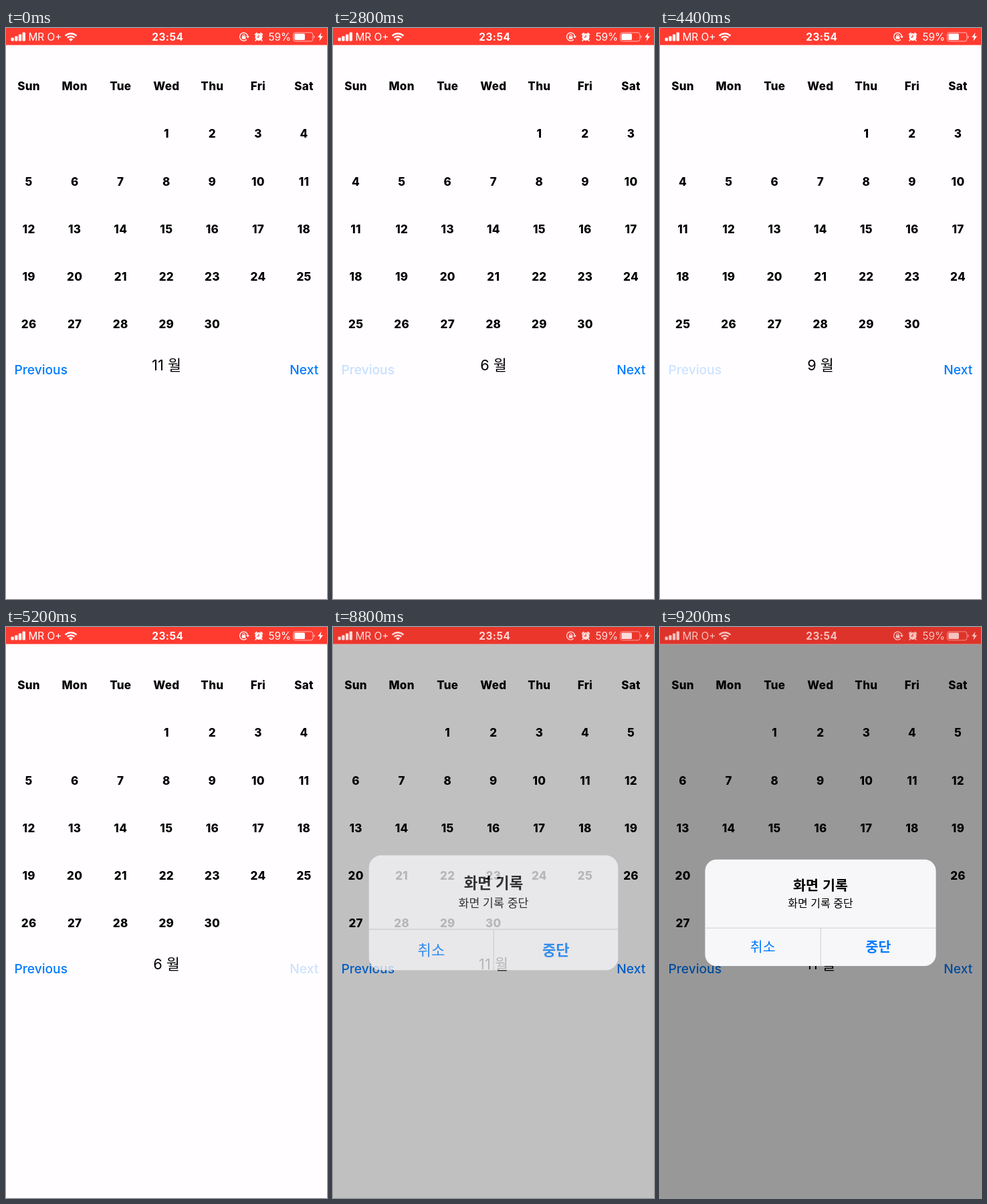
These frames come from a looping animation (480 px wide and 854 px high, 9300 ms). An HTML page:

```html
<!DOCTYPE html>
<html lang="ko">
<head>
<meta charset="utf-8">
<title>Calendar</title>
<style>
  html, body { margin: 0; width: 100%; height: 100%; overflow: hidden; background: #fffdff; }
  svg { display: block; width: 100vw; height: 100vh; }
  text { font-family: Inter, 'Noto Sans CJK KR', 'Noto Sans CJK', sans-serif; white-space: pre; }
  .mid { text-anchor: middle; }
  #grid text { font-size: 17px; font-weight: 800; letter-spacing: .3px; text-anchor: middle; }
  .btn { font-size: 19.2px; font-weight: 500; fill: #007aff; }
  #month { font-size: 21.76px; }
  #status { fill: #fff; font-size: 15.36px; }
  .line { fill: none; stroke: #fff; }
  #alert text { font-family: 'Noto Sans CJK KR', 'Noto Sans CJK', sans-serif; text-anchor: middle; }
  #alert .action { font-size: 20.5px; fill: #007aff; }
  #alert .bold { font-weight: 700; }
</style>
</head>
<body>
<svg viewBox="0 0 480 854">
  <rect width="480" height="854" fill="#fffdff"/>
  <g id="grid"></g>
  <text id="prev" class="btn" x="12.4" y="517.7">Previous</text>
  <text id="month" class="mid" x="240" y="512"></text>
  <text id="next" class="btn" x="467.3" y="517.7" text-anchor="end">Next</text>
  <rect id="dim" y="25.5" width="480" height="829"/>

  <rect width="480" height="25.5" fill="#ff3b30"/>
  <rect id="barDim" width="480" height="25.5"/>
  <g id="status">
    <rect x="7.5" y="14.6" width="4.3" height="4.8" rx="1"/>
    <rect x="13.2" y="12.2" width="4.3" height="7.2" rx="1"/>
    <rect x="18.9" y="9.6" width="4.3" height="9.8" rx="1"/>
    <rect x="24.6" y="6.6" width="4.3" height="12.8" rx="1"/>
    <text x="33.5" y="18.7">MR O+</text>
    <path class="line" stroke-width="2.5" d="M88.6 11.6A12 12 0 0 1 105.4 11.6M91.7 14.7A7.6 7.6 0 0 1 102.3 14.7"/>
    <path d="M97 20L93.9 16.9A4.4 4.4 0 0 1 100.1 16.9Z"/>
    <text class="mid" x="241.8" y="18.7" font-weight="700" letter-spacing=".5">23:54</text>
    <path class="line" stroke-width="1.3" d="M359.8 17.3A6 6 0 1 1 361.5 12.3"/>
    <path d="M359 12.2H364L361.5 15.6Z"/>
    <rect x="352.7" y="12.3" width="5.6" height="4.2" rx=".6"/>
    <path class="line" stroke-width="1.1" d="M353.9 12.5V11.3A1.6 1.6 0 0 1 357.1 11.3V12.5"/>
    <circle cx="378" cy="13.4" r="5.5"/>
    <path class="line" stroke-width="1.8" stroke-linecap="round" d="M372.6 9.7L375 7.6M383.4 9.7L381 7.6M374 18L373.2 18.9M382 18L382.8 18.9"/>
    <path fill="none" stroke="#ff3b30" stroke-width="1.1" d="M378 10V13.6H375.2"/>
    <text x="392.4" y="18.7">59%</text>
    <rect class="line" x="429.6" y="6.9" width="29.3" height="12.9" rx="3" stroke-opacity=".65"/>
    <rect x="431.3" y="8.6" width="15.6" height="9.5" rx="1.4"/>
    <path d="M460.2 11.1A2.5 2.5 0 0 1 460.2 15.6Z" opacity=".65"/>
    <path d="M471.6 6.8L466.2 14H469.6L468.4 19.8L474 12.2H470.5Z"/>
  </g>

  <g id="alert">
    <rect x="67.4" y="347.8" width="345.2" height="159.2" rx="17" fill="#f7f6f8"/>
    <path d="M67.4 450.3H412.6M240.3 450.3V507" stroke="#cfced1" fill="none"/>
    <text class="bold" x="240" y="393.8" font-size="20.7">화면 기록</text>
    <text x="240" y="419.2" font-size="16">화면 기록 중단</text>
    <text class="action" x="153.7" y="486.2">취소</text>
    <text class="action bold" x="326.4" y="486.2">중단</text>
  </g>
</svg>
<script>
const LOOP = 9300, STEP = 100, FADE = 470, ALERT_AT = 8700;
const $ = id => document.getElementById(id);

function cell(col, row, label = '') {
  const el = document.createElementNS('http://www.w3.org/2000/svg', 'text');
  el.setAttribute('x', 34.1 + col * 68.57);
  el.setAttribute('y', 93 + row * 71.25);
  el.textContent = label;
  return $('grid').appendChild(el);
}
['Sun', 'Mon', 'Tue', 'Wed', 'Thu', 'Fri', 'Sat'].forEach((day, i) => cell(i, 0, day));
const cells = Array.from({ length: 35 }, (_, i) => cell(i % 7, 1 + Math.floor(i / 7)));

// Button taps: the month turns on release
const taps = [{ dir: -1, down: 1250, up: 1450 }];
function addTaps(dir, count, start, gap, hold) {
  for (let k = 0; k < count; k++) {
    const down = start + k * gap;
    taps.push({ dir, down, up: down + hold(k) });
  }
}
addTaps(-1, 16, 2180, 165, k => k === 5 || k === 6 ? 140 : 80);
addTaps(1, 5, 5150, 148, () => 85);

function buttonAlpha(dir, t) {
  const tap = taps.filter(p => p.dir === dir && p.down <= t).pop();
  if (!tap) return 1;
  const p = Math.min(1, Math.max(0, (t - tap.up) / FADE));
  return 0.2 + 0.8 * p * p * (3 - 2 * p);
}

function showMonth(offset) {
  const first = new Date(2017, 10 + offset, 1);
  const days = new Date(2017, 11 + offset, 0).getDate();
  $('month').textContent = `${first.getMonth() + 1} 월`;
  cells.forEach((el, i) => {
    const day = i - first.getDay() + 1;
    el.textContent = day > 0 && day <= days ? day : '';
  });
}

function showAlert(t) {
  const x = Math.max(0, t - ALERT_AT) / 49;
  const p = 1 - (1 + x) * Math.exp(-x); // critically damped spring
  const scale = 1.2 - 0.2 * p;
  $('dim').setAttribute('opacity', 0.4 * p);
  $('barDim').setAttribute('opacity', 0.13 * p);
  $('status').setAttribute('opacity', 1 - 0.3 * p);
  $('alert').setAttribute('opacity', Math.min(1, 1.22 * p));
  $('alert').setAttribute('transform', `translate(240 427.4) scale(${scale}) translate(-240 -427.4)`);
}

let shown = -1;
function draw(now) {
  const t = Math.floor(now % LOOP / STEP) * STEP;
  if (t !== shown) {
    shown = t;
    showMonth(taps.reduce((sum, p) => p.up <= t ? sum + p.dir : sum, 0));
    $('prev').setAttribute('opacity', buttonAlpha(-1, t));
    $('next').setAttribute('opacity', buttonAlpha(1, t));
    showAlert(t);
  }
}

const start = performance.now();
function tick() {
  draw(performance.now() - start);
  requestAnimationFrame(tick);
}
tick();
</script>
</body>
</html>
```
